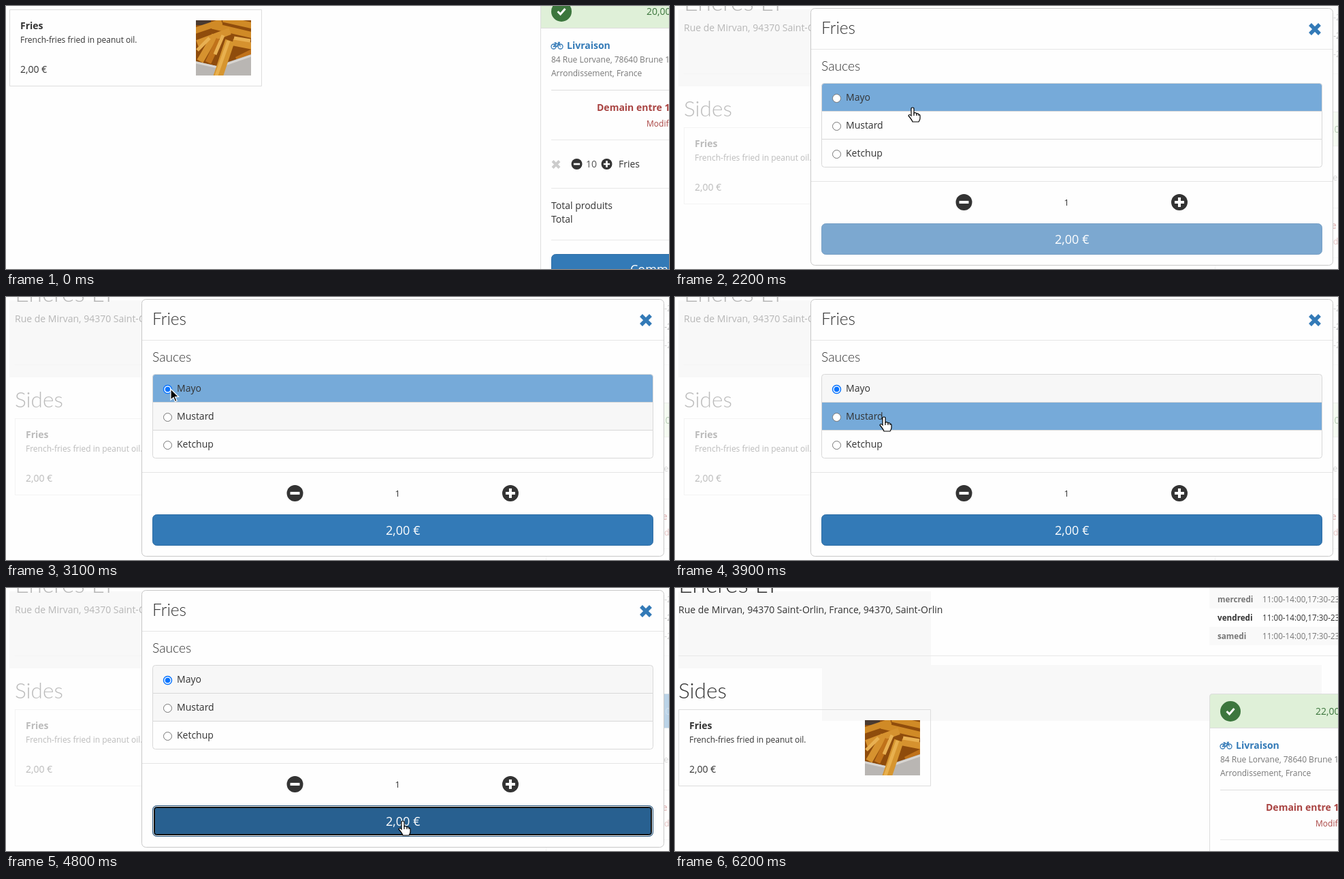
An HTML page with a canvas for the animation above (6700 ms loop, 974 px wide and 386 px high).

```html
<!DOCTYPE html>
<html lang="fr">
<head>
<meta charset="utf-8">
<style>
html, body { margin: 0; width: 100%; height: 100%; overflow: hidden; background: #fefefe; }
canvas { display: block; }
</style>
</head>
<body>
<canvas id="stage" width="974" height="386"></canvas>
<script>
const ctx = document.getElementById('stage').getContext('2d');
const LOOP = 6700, OPEN = 1500, CLOSE = 5000;
const SCROLL = 173;
const INK = '#333', BLUE = '#337ab7', GREEN = '#3c763d', RED = '#a94442';

// Pointer positions: time, x, y
const path = [
  [200, 870, 238], [400, 550, 245], [500, 380, 243], [600, 212, 146], [700, 230, 70],
  [800, 294, 36], [900, 345, 40], [1000, 330, 60], [1100, 311, 69], [1500, 311, 71],
  [2000, 311, 71], [2100, 335, 108], [2200, 349, 148], [2500, 272, 156], [2600, 254, 160],
  [2700, 241, 125], [2800, 242, 135], [3700, 242, 135], [3800, 255, 150], [4000, 358, 200],
  [4200, 505, 304], [4300, 583, 341], [5600, 583, 341], [6000, 880, 130], [6100, 955, 109], [6200, 990, 109]
];
const handShape = new Path2D('M-2 3Q-2 1 0 1T2 3V9Q5 8 6 10Q8 9 9 11Q11 11 11 13V17Q11 19 9 22H0Q-1 19-6 13Q-5 10-2 13Z');
const handLines = new Path2D('M2 9v4M6 10v3M9 11v2');
const arrowShape = new Path2D('M0 0V16L4 12.5L6.5 18.5L9 17.5L6.5 11.5H11.5Z');

function text(str, x, y, size = 14, color = INK, weight = 400, family = '"Open Sans", sans-serif') {
  ctx.font = `${weight} ${size}px ${family}`;
  ctx.fillStyle = color;
  ctx.fillText(str, x, y);
}

const heading = (str, x, y, size) => text(str, x, y, size, INK, 300, 'Lato, sans-serif');

function rect(x, y, w, h, color) {
  ctx.fillStyle = color;
  ctx.fillRect(x, y, w, h);
}

function box(x, y, w, h, radius, fill, border) {
  ctx.beginPath();
  ctx.roundRect(x + .5, y + .5, w - 1, h - 1, radius);
  if (fill) { ctx.fillStyle = fill; ctx.fill(); }
  if (border) { ctx.strokeStyle = border; ctx.lineWidth = 1; ctx.stroke(); }
}

function disc(x, y, r, color) {
  ctx.beginPath();
  ctx.arc(x, y, r, 0, 7);
  ctx.fillStyle = color;
  ctx.fill();
}

function stroke(shape, color, width) {
  ctx.strokeStyle = color;
  ctx.lineWidth = width;
  ctx.stroke(new Path2D(shape));
}

function cross(x, y, r, color, width) {
  stroke(`M${x - r} ${y - r}L${x + r} ${y + r}M${x + r} ${y - r}L${x - r} ${y + r}`, color, width);
}

function stepButton(x, y, r, plus) {
  const arm = r * .58;
  disc(x, y, r, INK);
  stroke(`M${x - arm} ${y}h${2 * arm}` + (plus ? `M${x} ${y - arm}v${2 * arm}` : ''), '#fff', r * .34);
}

function mix(from, to, k) {
  return `rgb(${from.map((c, i) => Math.round(c + (to[i] - c) * k))})`;
}

function fries(x, y) {
  ctx.save();
  ctx.translate(x, y);
  ctx.beginPath();
  ctx.rect(0, 0, 81, 81);
  ctx.clip();
  rect(0, 0, 81, 81, '#8f4c0c');
  rect(0, 0, 22, 7, '#4a3a30');
  stroke('M-4 16L38 2M24 8L84 22M40 -2L84 8', '#d08a26', 9);
  stroke('M2 34L50 16M54 32L84 38M6 60L28 22', '#d6922f', 10);
  stroke('M18 62L34 28M60 58L84 46', '#c0721a', 9);
  stroke('M2 44L20 26M28 50L40 22M56 26L80 30', '#e8b052', 5);
  ctx.fillStyle = '#b9b6b3';
  ctx.fill(new Path2D('M0 60L30 67L81 50V81H0Z'));
  stroke('M0 62L32 69L81 52', '#d8d5d1', 3);
  stroke('M50 30L32 84', '#d6952f', 14);
  stroke('M48 30L29 84', '#e8b04e', 5);
  ctx.restore();
}

function card(y, fill, ink = INK) {
  box(5, y, 371, 113, 0, fill, '#ddd');
  text('Fries', 21, y + 29, 14, ink, 700);
  text('French-fries fried in peanut oil.', 21, y + 49, 12, ink);
  text('2,00 €', 21, y + 93, 14, ink);
  fries(279, y + 16);
}

function cart(dy, amount, loading) {
  ctx.save();
  ctx.translate(0, dy);
  box(785, -18, 220, 500, 4, '#fefefe', '#ddd');
  box(785, -18, 220, 51, [4, 4, 0, 0], mix([223, 240, 216], [51, 122, 183], loading), '#ddd');
  disc(816, 8, 15, GREEN);
  stroke('M810.5 8l4 4l7-8', '#fff', 3);
  text(amount, 941, 13, 14, mix([60, 118, 61], [255, 255, 255], loading));
  stroke('M808 59.5a3.5 3.5 0 1 0-7 0a3.5 3.5 0 1 0 7 0M818 59.5a3.5 3.5 0 1 0-7 0a3.5 3.5 0 1 0 7 0M804.5 59.5l3-4h5l-3.5 4zM814.5 59.5l-3-6h2.5M805.5 54h3', BLUE, 1.3);
  text('Livraison', 824, 63, 14, BLUE, 700);
  text('84 Rue Lorvane, 78640 Brune 11e', 801, 83, 12, '#777');
  text('Arrondissement, France', 801, 103, 12, '#777');
  rect(801, 123, 180, 1, '#ddd');
  text('Demain entre 11:00', 868, 154, 14, RED, 700);
  text('Modifier', 941, 177, 12, RED);
  for (const y of [196, 267, 343]) rect(801, y, 180, 1, '#e8e8e8');
  cross(808, 232.5, 5, '#ccc', 4);
  stepButton(838.5, 232, 8, false);
  text('10', 852, 237, 14, '#555');
  stepButton(882.5, 232, 8, true);
  text('Fries', 900, 237);
  text('Total produits', 801, 298);
  text('Total', 801, 318);
  box(801, 364, 190, 46, 6, BLUE, '#2e6da4');
  text('Commander', 917, 393, 18, '#fff');
  ctx.restore();
}

function restaurant(amount, loading) {
  heading('Encres LT', 5, 7, 36);
  text('Rue de Mirvan, 94370 Saint-Orlin, France, 94370, Saint-Orlin', 5, 37);
  rect(785, 0, 189, 30, '#f9f9f9');
  rect(785, 57, 189, 27, '#f9f9f9');
  ['mercredi', 'vendredi', 'samedi'].forEach((day, i) => {
    const ink = i === 1 ? INK : '#777';
    text(day, 797, 21 + 27 * i, 11.7, ink, 700);
    text('11:00-14:00,17:30-23:00', 863, 21 + 27 * i, 11.7, ink);
  });
  rect(5, 99, 969, 1, '#e8e8e8');
  heading('Sides', 5, 162, 31.5);
  card(5 + SCROLL);
  cart(SCROLL, amount, loading);
}

function radio(x, y, checked) {
  ctx.beginPath();
  ctx.arc(x, y, 6, 0, 7);
  ctx.fillStyle = '#fff';
  ctx.fill();
  ctx.strokeStyle = checked ? '#0a75ff' : '#767676';
  ctx.lineWidth = checked ? 1.5 : 1;
  ctx.stroke();
  if (checked) disc(x, y, 3.8, '#0a75ff');
}

function payButton(t) {
  if (t < 3000) box(215, 319, 736, 46, 6, '#7ca8d0', '#78a0c5');
  else if (t < 3100) box(215, 319, 736, 46, 6, '#5791c4', '#538abc');
  else if (t < 4300) box(215, 319, 736, 46, 6, BLUE, '#2e6da4');
  else box(215, 319, 736, 46, 6, t >= 4600 && t < 4800 ? '#204d74' : '#286090', '#204d74');
  if (t >= 4600) {
    box(216, 320, 734, 44, 5, null, '#fff');
    box(217, 321, 732, 42, 4, null, '#101010');
    box(218, 322, 730, 40, 3, null, '#101010');
  }
  text('2,00 €', 558, 349, 18, '#fff');
}

function modal(t, pointer) {
  box(199, 3, 768, 378, 6, '#fefefe', '#c8c8c8');
  heading('Fries', 215, 41, 24.5);
  cross(940, 34, 7, BLUE, 5.5);
  rect(200, 63, 766, 1, '#e5e5e5');
  heading('Sauces', 215, 95, 19.3);
  const touched = [2200, 2400, Infinity];
  ['Mayo', 'Mustard', 'Ketchup'].forEach((sauce, i) => {
    const y = 113 + 41 * i;
    const hover = pointer.y >= y && pointer.y < y + 41;
    const radius = [[4, 4, 0, 0], 0, [0, 0, 4, 4]][i];
    box(215, y, 736, 42, radius, hover ? '#76aad9' : t >= touched[i] ? '#f7f7f7' : '#fefefe', '#d8d8d8');
    radio(237.5, y + 22.5, i === 0 && t >= 3000);
    text(sauce, 251, y + 26);
  });
  rect(200, 257, 766, 1, '#e5e5e5');
  stepButton(424.5, 288, 12, false);
  text('1', 571.5, 293, 13);
  stepButton(741, 288, 12, true);
  payButton(t);
}

function pointerAt(t) {
  const next = path.findIndex(p => p[0] > t);
  if (next < 1) return { x: -50, y: -50 };
  const [t0, x0, y0] = path[next - 1], [t1, x1, y1] = path[next];
  const k = t0 === 1100 ? 0 : (t - t0) / (t1 - t0); // rests until the dialog opens
  return { x: x0 + (x1 - x0) * k, y: y0 + (y1 - y0) * k };
}

function drawPointer({ x, y }, hand) {
  ctx.save();
  ctx.translate(Math.round(x), Math.round(y));
  ctx.lineWidth = 1.2;
  ctx.fillStyle = hand ? '#fff' : '#000';
  ctx.strokeStyle = hand ? '#000' : '#fff';
  const shape = hand ? handShape : arrowShape;
  ctx.fill(shape);
  ctx.stroke(shape);
  if (hand) ctx.stroke(handLines);
  ctx.restore();
}

function draw(t) {
  const pointer = pointerAt(t);
  const { x, y } = pointer;
  let hand = false;
  rect(0, 0, 974, 386, '#fefefe');
  if (t < OPEN) {
    const hover = x > 5 && x < 376 && y > 5 && y < 118;
    hand = hover || Math.hypot(x - 882, y - 232) < 14;
    if (hover) card(5, '#f4f4f4', '#555');
    else card(5, '#fefefe');
    cart(0, '20,00 €', 0);
  } else {
    rect(5, 5, 371, 113, '#f8f8f8');
    if (t < CLOSE) {
      ctx.save();
      ctx.translate(8, 0);
      ctx.globalAlpha = .33;
      restaurant('20,00 €', t >= 4800 ? 1 : 0);
      ctx.restore();
      modal(t, pointer);
      const onRow = y >= 113 && y < 236;
      hand = (onRow && !(t >= 2800 && t < 3800)) || y >= 319;
    } else {
      rect(216, 113, 734, 82, '#f8f8f8');
      restaurant('22,00 €', Math.max(0, 1 - (t - CLOSE) / 600));
    }
  }
  drawPointer(pointer, hand);
}

function tick() {
  // The screen refreshes ten times a second.
  draw(Math.floor(performance.now() % LOOP / 100) * 100);
  requestAnimationFrame(tick);
}
tick();
</script>
</body>
</html>
```
